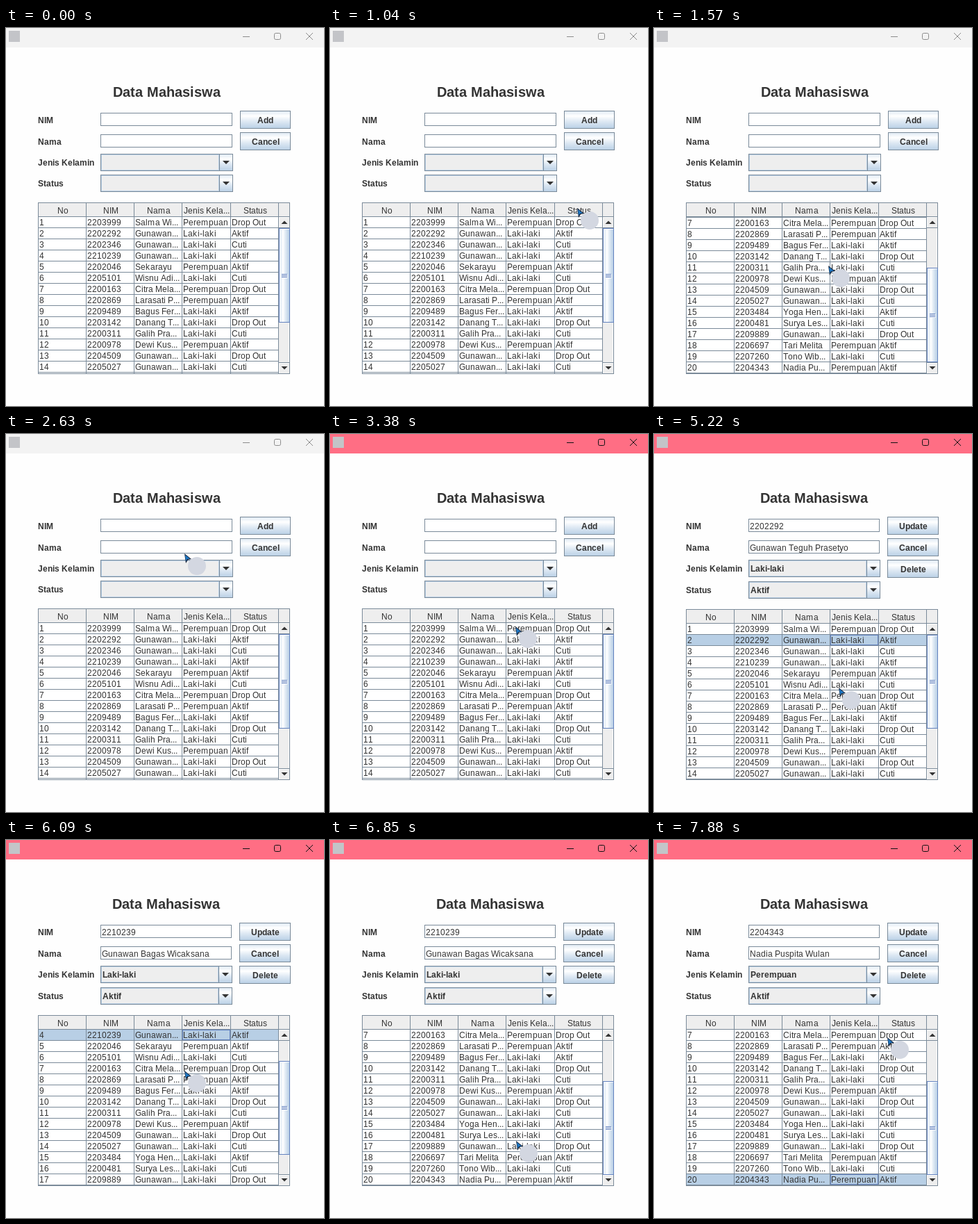
An HTML page with a canvas for the animation above (8 s loop, 458 by 544 pixels).

```html
<!DOCTYPE html>
<html lang="id">
<head>
<meta charset="utf-8">
<title>Data Mahasiswa</title>
<style>
html, body { margin: 0; width: 458px; height: 544px; overflow: hidden; background: #fff }
canvas { display: block }
</style>
</head>
<body>
<canvas id="stage" width="458" height="544"></canvas>
<script>
const ctx = document.getElementById('stage').getContext('2d');
const LOOP = 8000, TICK = 122;
const LINE = '#7a8a99', PANEL = '#eee', INK = '#333', SELECT = '#b8cfe5', FOCUS = '#6382bf';
const ROW = 16, ROWS = 20;

// nim, gender, status, name
const students = `2203999 P D Salma Wi...
2202292 L A Gunawan...
2202346 L C Gunawan...
2210239 L A Gunawan...
2202046 P A Sekarayu
2205101 L C Wisnu Adi...
2200163 P D Citra Mela...
2202869 P A Larasati P...
2209489 L A Bagus Fer...
2203142 L D Danang T...
2200311 L C Galih Pra...
2200978 P A Dewi Kus...
2204509 L D Gunawan...
2205027 L C Gunawan...
2203484 L A Yoga Hen...
2200481 L C Surya Les...
2209889 L D Gunawan...
2206697 P A Tari Melita
2207260 L C Tono Wib...
2204343 P A Nadia Pu...`.split('\n').map((line, i) => {
  const [nim, gender, status, ...name] = line.split(' ');
  return [String(i + 1), nim, name.join(' '),
    { P: 'Perempuan', L: 'Laki-laki' }[gender],
    { D: 'Drop Out', A: 'Aktif', C: 'Cuti' }[status]];
});
const fullNames = {
  1: 'Salma Widyaningrum', 2: 'Gunawan Teguh Prasetyo',
  4: 'Gunawan Bagas Wicaksana', 20: 'Nadia Puspita Wulan'
};
const headers = ['No', 'NIM', 'Nama', 'Jenis Kela...', 'Status'];
const columnX = i => Math.round(46.8 + 69.2 * i);

// [time, value]: hard changes
const scrolls = [[0, 0], [1570, 95], [2000, 0], [6090, 48], [6210, 96]];
const selections = [[0, 0], [3530, 1], [4850, 2], [5830, 4], [7240, 20]];
const at = (track, t) => track.findLast(step => step[0] <= t)[1];

// Pointer glides: start, end, x, y
const glides = [
  [558, 1290, 251, 342], [2028, 2630, 258, 152], [2630, 3240, 267, 277],
  [4088, 4450, 266, 297], [4978, 5220, 266, 365], [5220, 5710, 257, 332],
  [6338, 6460, 257, 341], [6488, 7120, 274, 483], [7638, 7880, 336, 284]
];

// The pointer is sampled in ticks, so it moves in small jumps
function pointerAt(t) {
  let x = 460, y = 175;
  for (const [start, end, toX, toY] of glides) {
    if (t < start) break;
    const ticks = Math.round((end - start) / TICK);
    const p = Math.min(1, Math.floor((t - start + 4) / TICK) / ticks);
    const eased = p * p * (3 - 2 * p);
    x += (toX - x) * eased;
    y += (toY - y) * eased;
  }
  return [Math.round(x), Math.round(y)];
}

function rect(x, y, w, h, fill) {
  ctx.fillStyle = fill;
  ctx.fillRect(x, y, w, h);
}

function box(x, y, w, h, fill, border = LINE) {
  rect(x, y, w, h, border);
  rect(x + 1, y + 1, w - 2, h - 2, fill);
}

function poly(fill, ...points) {
  ctx.fillStyle = fill;
  ctx.beginPath();
  points.forEach(([x, y]) => ctx.lineTo(x, y));
  ctx.closePath();
  ctx.fill();
}

// Triangle with its base at y; negative height points up
const arrow = (cx, y, half, height) =>
  poly(INK, [cx - half, y], [cx + half, y], [cx, y + height]);

const fontOf = (size, bold) =>
  `${bold ? 'bold ' : ''}${size}px "Liberation Sans", Arial, sans-serif`;

// Whole-pixel advances, as in the desktop toolkit, from unhinted widths
const advances = {};
function advance(ch, size, bold) {
  const key = ch + size + bold;
  if (!(key in advances)) {
    ctx.font = fontOf(size * 20, bold);
    const extra = !bold && /[km]/.test(ch) ? 1 : 0;
    advances[key] = Math.round(ctx.measureText(ch).width / 20) + extra;
  }
  return advances[key];
}

function text(s, x, y, { bold = false, size = 12, center = false } = {}) {
  const widths = [...s].map(ch => advance(ch, size, bold));
  if (center) x = Math.round(x - widths.reduce((a, b) => a + b, 0) / 2);
  ctx.font = fontOf(size, bold);
  ctx.fillStyle = INK;
  [...s].forEach((ch, i) => {
    ctx.fillText(ch, x, y);
    x += widths[i];
  });
}

function gloss(x0, y0, x1, y1) {
  const g = ctx.createLinearGradient(x0, y0, x1, y1);
  [[0, '#dde8f3'], [.3, '#fff'], [.6, '#dde8f3'], [1, SELECT]].forEach(s => g.addColorStop(...s));
  return g;
}

function button(label, x, y) {
  const w = 410 - x;
  box(x, y, w, 26, gloss(0, y, 0, y + 26));
  text(label, x + w / 2, y + 18, { bold: true, center: true });
}

function combo(value, y, right) {
  const bx = right - 20;
  box(136, y, right - 136, 25, SELECT);
  rect(138, y + 2, bx - 139, 21, PANEL);
  box(bx, y, 20, 25, gloss(0, y, 0, y + 25));
  arrow(bx + 10, y + 10, 5, 5);
  text(value, 139, y + 17, { bold: true });
}

function field(value, y, right) {
  box(136, y, right - 136, 19, '#fff');
  text(value, 138, y + 15);
}

function titleBar(active) {
  rect(0, 0, 458, 28, active ? '#ff6e84' : '#f3f3f3');
  rect(4, 4, 16, 16, '#c3c4c8');
  ctx.strokeStyle = active ? '#111' : '#8c8c8c';
  ctx.lineWidth = 1;
  ctx.beginPath();
  ctx.moveTo(341, 12.5); ctx.lineTo(351, 12.5);
  ctx.roundRect(386.5, 7.5, 9, 9, 2);
  ctx.moveTo(432, 7); ctx.lineTo(442, 17);
  ctx.moveTo(442, 7); ctx.lineTo(432, 17);
  ctx.stroke();
}

function form(selected) {
  const row = students[selected - 1] || [];
  const shift = selected ? 1 : 0, right = 326 - shift;
  const label = (s, y) => text(s, 46, y, { bold: true });
  text('Data Mahasiswa', 154 - shift, 99, { bold: true, size: 20 });
  label('NIM', 137);
  label('Nama', 168);
  label('Jenis Kelamin', 198);
  label('Status', 228 + shift);
  field(row[1] || '', 122, right);
  field(fullNames[selected] || '', 153, right);
  combo(row[3] || '', 181, right + 1);
  combo(row[4] || '', 211 + shift, right + 1);
  button(selected ? 'Update' : 'Add', right + 11, 119);
  button('Cancel', right + 11, 150);
  if (selected) button('Delete', right + 11, 181);
}

function scrollBar(top, height, scroll) {
  const track = height - 32, content = ROW * ROWS;
  const thumb = Math.ceil(track * height / content);
  const y = top + 16 + Math.round(scroll * track / content);
  box(392, top - 1, 17, height + 2, PANEL);
  for (const by of [top - 1, top + height - 16]) {
    box(392, by, 17, 17, '#fff');
    rect(394, by + 2, 14, 14, PANEL);
  }
  arrow(401, top + 10, 4.5, -4.5);
  arrow(401, top + height - 10, 4.5, 4.5);
  rect(407, top + 16, 1, track, '#fff');
  box(393, y, 16, thumb, '#fff', FOCUS);
  rect(395, y + 2, 13, thumb - 3, gloss(395, 0, 408, 0));
  const mid = y + (thumb >> 1);
  for (const dy of [-2, 0, 2]) {
    rect(397, mid + dy, 8, 1, FOCUS);
    rect(398, mid + dy + 1, 8, 1, '#fff');
  }
}

function table(scroll, selected) {
  const shift = selected ? 1 : 0;
  const top = 272 + shift, height = 225 - shift;
  box(46, top - 21, 363, height + 22, '#fff');
  rect(47, top - 20, 361, 19, PANEL);
  rect(47, top - 1, 361, 1, LINE);
  headers.forEach((h, i) => {
    text(h, (columnX(i) + columnX(i + 1)) / 2, top - 5, { center: true });
    rect(columnX(i + 1) - 1, top - 20, 1, 20, LINE);
  });
  ctx.save();
  ctx.beginPath();
  ctx.rect(47, top, 346, height);
  ctx.clip();
  students.forEach((row, i) => {
    const y = top + i * ROW - scroll;
    if (i + 1 === selected) {
      rect(47, y, 346, ROW - 1, SELECT);
      box(columnX(3), y, 69, ROW - 1, SELECT, FOCUS);
    }
    rect(47, y + ROW - 1, 346, 1, LINE);
    row.forEach((cell, c) => {
      text(cell, columnX(c) + 1, y + 12);
      rect(columnX(c + 1) - 1, y, 1, ROW, LINE);
    });
  });
  ctx.restore();
  scrollBar(top, height, scroll);
}

function drawPointer(x, y, overField) {
  ctx.fillStyle = '#d3d7e1';
  ctx.beginPath();
  ctx.arc(x + 18, y + 18, 13, 0, 7);
  ctx.fill();
  if (overField) {
    rect(x + 2, y + 1, 1, 28, '#111');
    rect(x, y, 6, 1, '#111');
    rect(x, y + 29, 6, 1, '#111');
    return;
  }
  poly('#16233a', [x, y], [x + 10, y + 8], [x + 5, y + 9], [x + 2, y + 14]);
  poly('#1f78c4', [x + 1, y + 2], [x + 8, y + 7.5], [x + 4, y + 8], [x + 2, y + 11]);
}

function draw(t) {
  const scroll = at(scrolls, t), selected = at(selections, t);
  const [x, y] = pointerAt(t);
  rect(0, 0, 458, 544, '#fefefe');
  titleBar(t >= 3250);
  form(selected);
  table(scroll, selected);
  drawPointer(x, y, y >= 150 && y < 172 && x < 326);
}

const start = performance.now();
function tick() {
  draw((performance.now() - start) % LOOP);
  requestAnimationFrame(tick);
}
tick();
</script>
</body>
</html>
```
